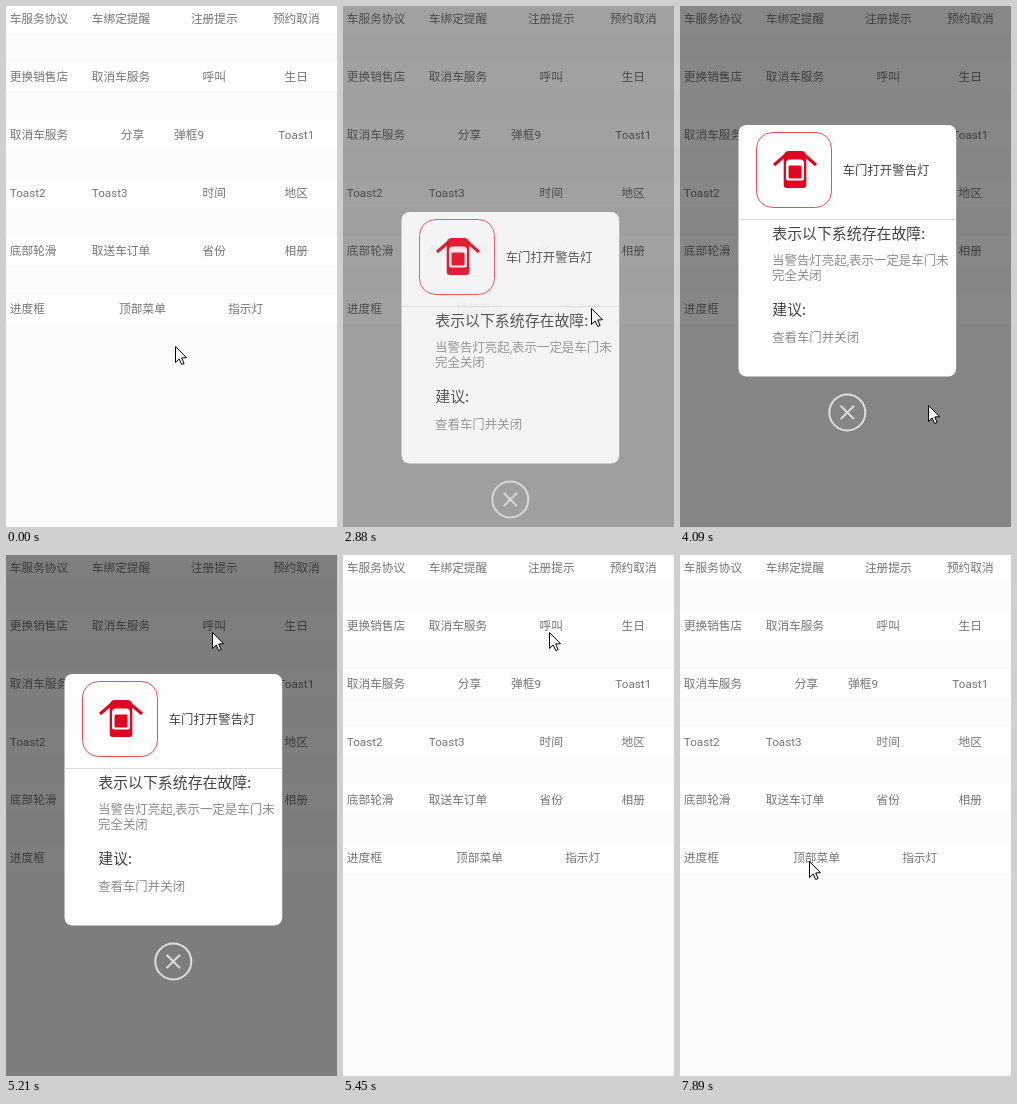
These frames come from a looping animation (331x521 px, 8000 ms). An HTML page with a canvas:

```html
<!DOCTYPE html>
<html lang="zh-CN">
<head>
<meta charset="utf-8">
<style>
html, body { margin: 0; width: 100%; height: 100%; overflow: hidden; background: #fcfcfc; }
canvas { display: block; width: 331px; height: 521px; }
</style>
</head>
<body>
<canvas id="stage"></canvas>
<script>
const W = 331, H = 521, LOOP = 8000;
const TICK = 136.4, LEAD = 25;
const ROW = 58.1;
const FONT = 'Roboto, "Noto Sans CJK SC", "Noto Sans CJK", "Noto Sans CJK JP", sans-serif';
const RED = '#e0061f';
const canvas = document.getElementById('stage');
const ctx = canvas.getContext('2d');
const dpr = window.devicePixelRatio || 1;
canvas.width = Math.round(W * dpr);
canvas.height = Math.round(H * dpr);

// A label sits in its column unless it brings its own centre.
const rows = [
  ['车服务协议', '车绑定提醒', '注册提示', '预约取消'],
  ['更换销售店', '取消车服务', '呼叫', '生日'],
  ['取消车服务', ['分享', 126.5], ['弹框9', 183], 'Toast1'],
  ['Toast2', 'Toast3', '时间', '地区'],
  ['底部轮滑', '取送车订单', '省份', '相册'],
  ['进度框', ['顶部菜单', 136.5], ['指示灯', 239.7]]
];
const columns = [[3.8, 'left'], [85.8, 'left'], [208.3, 'center'], [290.3, 'center']];

// Pointer path: tick, x, y
const path = [
  [5, 169, 340], [6, 163, 339], [10, 170, 312], [11, 178, 307],
  [13, 253, 305], [15, 248, 302], [24, 248, 302], [26, 240, 320],
  [28, 220, 357], [30, 248, 399], [34, 248, 399], [36, 211, 131],
  [38, 206, 77], [41, 206, 77], [44, 199, 198], [48, 196, 241],
  [50, 196, 241], [52, 159, 293], [54, 141, 306], [58, 129, 306]
];

const clamp = v => Math.max(0, Math.min(1, v));
const easeOut = (p, power) => 1 - (1 - p) ** power;

function pointerAt(tick) {
  const next = path.findIndex(key => key[0] > tick);
  if (next === 0) return path[0].slice(1);
  if (next < 0) return path[path.length - 1].slice(1);
  const [t0, x0, y0] = path[next - 1], [t1, x1, y1] = path[next];
  const p = (tick - t0) / (t1 - t0);
  return [x0 + (x1 - x0) * p, y0 + (y1 - y0) * p].map(Math.round);
}

function text(str, x, y, size, color, weight = 400, align = 'left') {
  ctx.font = `${weight} ${size}px ${FONT}`;
  ctx.fillStyle = color;
  ctx.textAlign = align;
  ctx.fillText(str, x, y);
}

function box(x, y, w, h, r) {
  ctx.beginPath();
  ctx.roundRect(x, y, w, h, r);
}

function poly(points, close = true) {
  ctx.beginPath();
  points.forEach(([x, y]) => ctx.lineTo(x, y));
  if (close) ctx.closePath();
}

function drawPage() {
  ctx.fillStyle = '#fbfbfb';
  ctx.fillRect(0, 0, W, H);
  rows.forEach((row, i) => {
    ctx.fillStyle = '#fefefe';
    ctx.fillRect(0, Math.round(i * ROW) - 2, W, 29);
    row.forEach((cell, c) => {
      const [label, centre] = [].concat(cell);
      const [x, align] = centre ? [centre, 'center'] : columns[c];
      text(label, x, 16.9 + i * ROW, 11.7, '#757575', 400, align);
    });
  });
}

function drawCar() {
  ctx.save();
  ctx.translate(115, 145);
  ctx.fillStyle = RED;
  box(-11.3, 0, 22.6, 37, [5, 5, 3, 3]);
  ctx.fill();
  ctx.fillStyle = '#fff';
  box(-9, 8.5, 18, 21, [4, 4, 2, 2]);
  ctx.fill();
  ctx.fillStyle = RED;
  box(-6.5, 14.5, 13, 13, 1.5);
  ctx.fill();
  ctx.strokeStyle = RED;
  ctx.lineWidth = 3;
  for (const side of [-1, 1]) {
    poly([[side * 10, 4.5], [side * 21, 14]], false);
    ctx.stroke();
  }
  ctx.restore();
}

function drawClose() {
  const x = 167.3, y = 406.4, arm = 6.7;
  ctx.strokeStyle = '#dedede';
  ctx.lineWidth = 2;
  ctx.beginPath();
  ctx.arc(x, y, 18, 0, Math.PI * 2);
  ctx.stroke();
  for (const s of [-arm, arm]) {
    poly([[x - arm, y - s], [x + arm, y + s]], false);
    ctx.stroke();
  }
}

function drawDialog(tick) {
  const open = clamp(Math.min(tick - 20, 40 - tick) / 2);
  if (!open) return;
  const shade = tick < 37 ? 0.47 : 0.5;
  ctx.fillStyle = `rgba(0,0,0,${shade * easeOut(open, 2.2)})`;
  ctx.fillRect(0, 0, W, H);
  ctx.save();
  ctx.globalAlpha = easeOut(open, 3.3);
  ctx.translate(0, 174 * (1 - open));
  ctx.fillStyle = '#fefefe';
  box(58.5, 119, 217.7, 251.6, 8);
  ctx.fill();
  ctx.fillStyle = '#dcdcdc';
  ctx.fillRect(58.5, 213, 217.7, 1);
  ctx.strokeStyle = '#ea4a5e';
  ctx.lineWidth = 1;
  box(76.5, 126.5, 75, 75, 16);
  ctx.stroke();
  drawCar();
  text('车门打开警告灯', 162.7, 168.7, 12.4, '#444');
  text('表示以下系统存在故障:', 92.3, 233, 14.9, '#444', 500);
  text('当警告灯亮起,表示一定是车门未', 92, 259.2, 12.45, '#8c8c8c');
  text('完全关闭', 92, 274.2, 12.45, '#8c8c8c');
  text('建议:', 92.3, 309.3, 14.9, '#444', 500);
  text('查看车门并关闭', 92, 335.8, 12.45, '#8c8c8c');
  drawClose();
  ctx.restore();
}

function drawPointer(x, y) {
  ctx.save();
  ctx.translate(x + 0.5, y + 0.5);
  poly([[0, 0], [0, 16], [3.7, 12.5], [6.2, 18], [8.6, 17], [6.2, 11.5], [11, 11.2]]);
  ctx.fillStyle = '#fff';
  ctx.fill();
  ctx.strokeStyle = '#000';
  ctx.lineWidth = 1;
  ctx.stroke();
  ctx.restore();
}

const start = performance.now();

function frame() {
  const t = (performance.now() - start) % LOOP;
  const tick = Math.floor((t + LEAD) / TICK);
  ctx.setTransform(dpr, 0, 0, dpr, 0, 0);
  drawPage();
  drawDialog(tick);
  drawPointer(...pointerAt(tick));
  requestAnimationFrame(frame);
}
frame();
</script>
</body>
</html>
```
